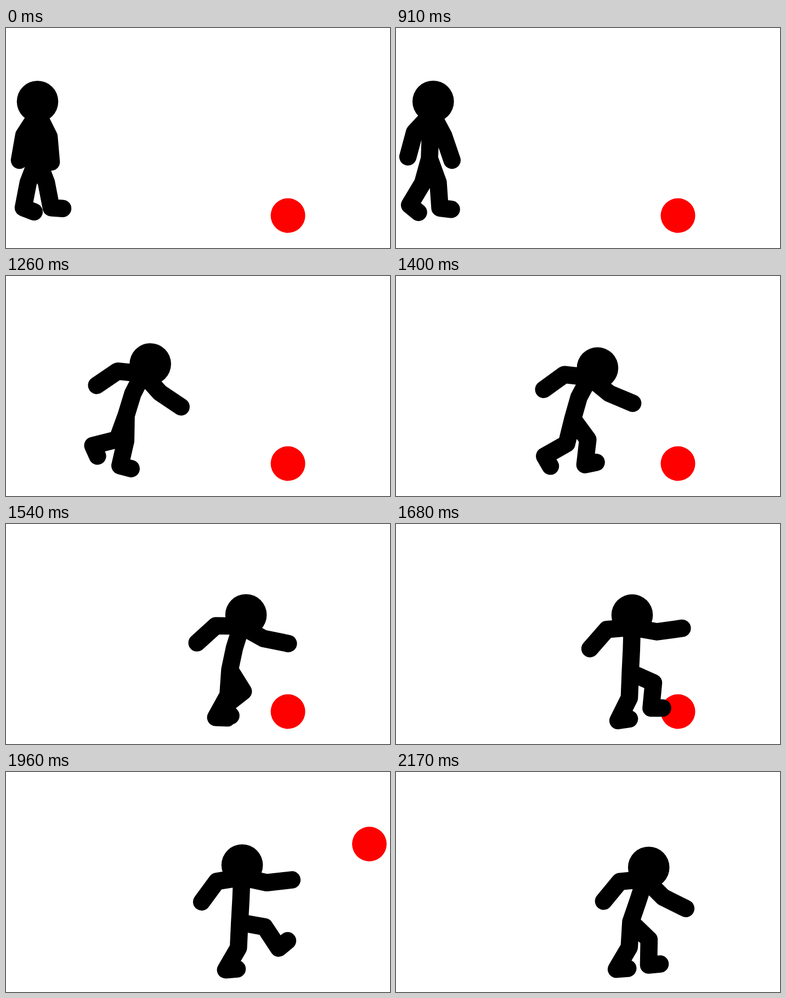
Write an HTML page that moves like this. It is 700x400 px and loops after 2520 ms.

```html
<!DOCTYPE html>
<html lang="en">
<head>
<meta charset="utf-8">
<title>Kick</title>
<style>
  html, body { margin: 0; width: 100%; height: 100%; overflow: hidden; background: #fff; }
  svg { display: block; width: 700px; height: 400px; }
  #body { fill: none; stroke: #000; stroke-width: 31.6; stroke-linecap: round; stroke-linejoin: round; }
</style>
</head>
<body>
<svg viewBox="0 0 700 400">
  <circle id="ball" r="31.5" fill="#f00"/>
  <path id="body"/>
  <circle id="head" r="37.8"/>
</svg>
<script>
const LOOP = 2520, STEP = 70, START = 840, LAST = 19;
const TORSO = 41, NECK = 22.3, LIMB = 46.3, FOOT = 21;

// Key points: stand, set off, run, stride, wind up, kick, land.
// Angles are in degrees, clockwise from pointing right.
const keys = [0, 1, 3, 6, 10, 14, 19];
const hipX = [57, 61, 107, 219, 408, 423, 428];
const hipY = [238, 237.5, 240, 253.5, 265, 273, 272.5];
const lean = [-89, -88, -80, -73, -78, -93, -71];
const backArm = [123, 133, 155.5, 186, 181, 170.5, 174.5];
const frontArm = [63.5, 62, 63, 48, 29, -1, 45];
const kickThigh = [111, 105.5, 76, 91, 58, 0, 44];
const kickShin = [101, 121, 147, 103, 142, 50, 91];
const standThigh = [69, 70, 88, 110, 94, 92.5, 93.5];
const standShin = [79, 86, 101.5, 166, 119, 120, 120.5];

const el = id => document.getElementById(id);
const ball = el("ball"), body = el("body"), head = el("head");
const clamp = (v, lo, hi) => Math.min(hi, Math.max(lo, v));

// Smooth curve through a track's key values
function at(track, k) {
  k = clamp(k, 0, LAST);
  const end = keys.length - 1;
  const i = Math.max(0, keys.findIndex(key => key >= k) - 1);
  const slope = j => {
    const a = Math.max(0, j - 1), b = Math.min(end, j + 1);
    return (track[b] - track[a]) / (keys[b] - keys[a]);
  };
  const h = keys[i + 1] - keys[i], u = (k - keys[i]) / h, v = 1 - u;
  return track[i] * v * v * (1 + 2 * u) + track[i + 1] * u * u * (1 + 2 * v)
    + h * u * v * (slope(i) * v - slope(i + 1) * u);
}

function chain(from, angles, lengths) {
  const points = [from];
  angles.forEach((deg, i) => {
    const [x, y] = points[i], r = deg * Math.PI / 180;
    points.push([x + lengths[i] * Math.cos(r), y + lengths[i] * Math.sin(r)]);
  });
  return points;
}

const pulse = (k, from, to) => Math.sin(Math.PI * clamp((k - from) / (to - from), 0, 1));
const line = points => "M" + points.map(p => p.map(v => v.toFixed(2)).join(" ")).join("L");

function place(circle, [x, y]) {
  circle.setAttribute("cx", x);
  circle.setAttribute("cy", y);
}

function ballAt(k) {
  if (k < 13) return [514, 341];
  const n = k - 14;
  return [575 + 43.7 * n, 228 - 72.5 * n + 12 * n * n];
}

function draw(k) {
  const hip = [at(hipX, k), at(hipY, k)];

  // The back curls forward with speed
  const speed = at(hipX, k + 0.5) - at(hipX, k - 0.5);
  const curl = speed / 4 - 1, tilt = at(lean, k);
  const spine = chain(hip, [tilt, tilt + curl, tilt + 2 * curl], [TORSO, TORSO, NECK]);

  // The elbows settle into a bend
  const arm = (angle, bend) => chain(spine[2], [angle, angle + bend], [LIMB, LIMB]);
  const back = arm(at(backArm, k), -45 + 22 * Math.exp(-k / 4));
  const front = arm(at(frontArm, k), -18.5 + 40 * Math.exp(-k / 2.7));

  // The legs pass each other between keys; the ankles tighten
  const leg = (thigh, shin, swing, ankle) => {
    const knee = at(shin, k) + swing;
    return chain(hip, [at(thigh, k) + swing, knee, knee + ankle], [LIMB, LIMB, FOOT]);
  };
  const leap = 25 * pulse(k, 6, 10), pass = 25 * pulse(k, 3, 6);
  const tight = Math.min(1, k / 12);
  const kick = leg(kickThigh, kickShin, leap - pass, -80 - 16 * tight);
  const stand = leg(standThigh, standShin, -2 * leap, -75 - 50 * tight);

  body.setAttribute("d", [spine, back, front, kick, stand].map(line).join(""));
  place(head, spine[3]);
  place(ball, ballAt(k));
}

function tick() {
  const t = performance.now() % LOOP;
  draw(clamp(Math.floor((t - START) / STEP), 0, LAST));
  requestAnimationFrame(tick);
}
tick();
</script>
</body>
</html>
```
